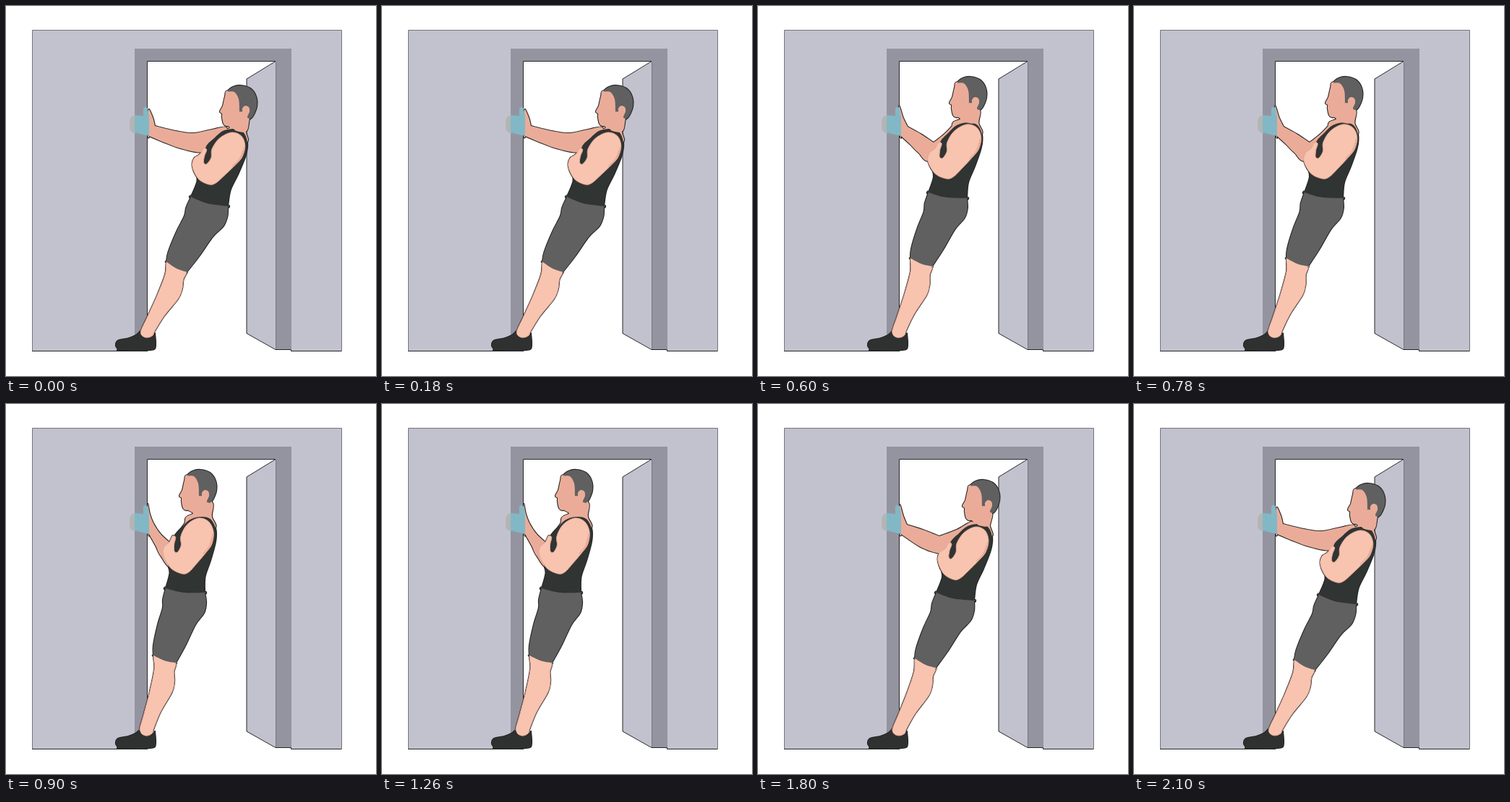
An HTML page with a canvas that plays this animation: 512x512 px, repeating every 2.4 s.

```html
<!DOCTYPE html>
<html lang="en">
<head>
<meta charset="utf-8">
<title>Doorway stretch</title>
<style>
html, body { margin: 0; width: 100%; height: 100%; overflow: hidden; background: #fff; }
canvas { display: block; width: 512px; height: 512px; }
</style>
</head>
<body>
<canvas id="stage" width="512" height="512"></canvas>
<script>
const ctx = document.getElementById('stage').getContext('2d');
const STEP = 300;
const ORDER = [0, 1, 2, 3, 3, 2, 1, 0];
const INK = '#252525', WALL = '#c2c2cf', JAMB = '#9494a0';
const SKIN = 'rgb(248, 196, 176)', SHADE = '#eaac98', TANK = '#303433', SHORTS = '#606060';

// Anchor points of each body part, one row per pose; shapes are drawn in the BASE pose.
const BASE = 1;
const anchors = {
  still: [[0, 0], [0, 0], [0, 0], [0, 0]],
  head: [[13, 5], [0, 0], [-18, -7], [-43, -14]],
  neck: [[309, 167, 336, 156, 334, 189], [297, 162, 324, 151, 324, 184],
         [279, 155, 307, 144, 310, 178], [258, 150, 286, 137, 290, 172]],
  torso: [[256, 264, 307, 277, 334, 189], [247, 261, 299, 272, 324, 184],
          [236, 258, 289, 266, 310, 178], [221, 255, 275, 261, 290, 172]],
  hips: [[222, 354, 256, 264, 307, 277], [217, 352, 247, 261, 299, 272],
         [211, 349, 236, 258, 289, 266], [204, 348, 221, 255, 275, 261]],
  leg: [[222, 354, 250, 367, 196, 458], [217, 352, 246, 365, 196, 458],
        [211, 349, 241, 360, 196, 458], [204, 348, 235, 358, 196, 458]],
  arm: [[312, 175, 281, 247, 259, 215], [301, 170, 271, 243, 250, 210],
        [288, 164, 261, 239, 236, 208], [266, 158, 244, 235, 218, 202]]
};

const farArm = [
  [197,144, 203,154, 206,166, 206,166, 235,173, 259,176, 285,171, 305,168, 300,185,
   275,202, 245,198, 222,190, 198,180, 198,180],
  [196,140, 201,155, 206,167, 206,167, 228,174, 251,183, 251,183, 275,174, 297,163,
   290,185, 265,207, 247,206, 225,198, 198,180, 198,180],
  [195,139, 201,155, 207,167, 207,167, 225,177, 243,189, 243,189, 258,177, 279,158,
   275,185, 238,214, 222,203, 210,191, 198,180, 198,180],
  [196,139, 199,152, 204,165, 214,180, 227,192, 227,192, 240,176, 256,155,
   250,190, 230,226, 214,210, 207,196, 198,180, 198,180]
];

const parts = [
  { rig: 'leg', fill: SKIN, edge: '#c99785', pts:
    [218,350, 216,370, 206,400, 194,430, 186,450, 189,457, 196,459, 203,456, 206,449,
     218,428, 236,404, 241,390, 242,377, 246,363, 232,345] },
  { rig: 'still', fill: '#2e3130', pts:
    [185,451, 185,451, 188,457, 195,460, 203,457, 206,454, 206,454, 207,466, 206,474,
     200,476, 185,477, 156,476, 156,476, 152,470, 155,463, 169,460, 179,456] },
  { rig: 'far', fill: SHADE },
  { rig: 'neck', fill: SHADE, pts:
    [292,156, 297,162, 297,164, 287,170, 290,190, 323,184, 321,168, 324,151, 310,140] },
  { rig: 'torso', fill: TANK, pts:
    [266,192, 278,179, 290,169, 305,166, 318,170, 324,184, 322,202, 312,228, 302,250,
     299,272, 299,272, 272,269, 247,261, 247,261, 255,240, 254,225, 264,212] },
  { rig: 'hips', fill: SHORTS, pts:
    [247,261, 247,261, 270,269, 299,272, 299,272, 299,286, 294,300, 280,315, 262,343,
     246,365, 246,365, 232,361, 217,352, 217,352, 219,338, 229,310, 239,288, 241,276] },
  { rig: 'head', fill: SHADE, pts:
    [294,112, 290,120, 287,133, 283,141, 286,144, 286,149, 288,158, 292,161, 298,161,
     306,168, 320,168, 324,150, 329,135, 320,115] },
  { rig: 'head', fill: SHORTS, pts:
    [294,113, 301,107, 312,105, 325,109, 333,120, 334,134, 329,147, 325,151, 325,151,
     321,149, 324,141, 323,135, 318,133, 314,137, 314,141, 310,141, 310,141, 309,124, 303,114] },
  { rig: 'arm', fill: SKIN, edge: '#dca793', pts:
    [301,170, 314,175, 319,189, 315,205, 306,216, 291,231, 280,241, 271,243, 257,235,
     249,218, 251,206, 259,200, 264,192, 268,194, 265,203, 264,212, 268,214, 274,205,
     275,193, 285,178] },
  { rig: 'arm', fill: SHADE, bare: true, pts:
    [318,190, 315,205, 305,217, 302,217, 311,207] }
];

// Moves points between poses by translation or a three-anchor affine map.
function mapper(a, b) {
  if (a.length < 6) return (x, y) => [x + b[0] - a[0], y + b[1] - a[1]];
  const axes = t => [t[2] - t[0], t[3] - t[1], t[4] - t[0], t[5] - t[1]];
  const [bx, by, cx, cy] = axes(a), [px, py, qx, qy] = axes(b);
  const det = bx * cy - by * cx;
  return (x, y) => {
    const dx = x - a[0], dy = y - a[1];
    const u = (dx * cy - dy * cx) / det, v = (bx * dy - by * dx) / det;
    return [b[0] + u * px + v * qx, b[1] + u * py + v * qy];
  };
}

// Closed smooth curve through the points; a doubled point makes a corner.
function smooth(flat, map = (x, y) => [x, y]) {
  const p = [], path = new Path2D();
  for (let i = 0; i < flat.length; i += 2) p.push(map(flat[i], flat[i + 1]));
  const n = p.length, at = i => p[(i + n) % n];
  path.moveTo(...p[0]);
  for (let i = 0; i < n; i++) {
    const [a, b, c, d] = [at(i - 1), at(i), at(i + 1), at(i + 2)];
    path.bezierCurveTo(b[0] + (c[0] - a[0]) / 6, b[1] + (c[1] - a[1]) / 6,
      c[0] - (d[0] - b[0]) / 6, c[1] - (d[1] - b[1]) / 6, c[0], c[1]);
  }
  path.closePath();
  return path;
}

const poses = farArm.map((reach, pose) => parts.map(part => ({
  ...part,
  path: part.rig === 'far' ? smooth(reach)
    : smooth(part.pts, mapper(anchors[part.rig][BASE], anchors[part.rig][pose]))
})));

function box(color, x, y, w, h) {
  ctx.fillStyle = color;
  ctx.fillRect(x, y, w, h);
}

function shape(d, fill, line) {
  const path = new Path2D(d);
  if (fill) { ctx.fillStyle = fill; ctx.fill(path); }
  if (line) { ctx.strokeStyle = line; ctx.lineWidth = 1; ctx.stroke(path); }
}

function drawRoom() {
  box('#fff', 0, 0, 512, 512);
  box(WALL, 36, 33, 429, 445);
  box(JAMB, 178, 59, 217, 419);
  box('#fff', 196, 77, 177, 401);
  box('#fff', 373, 476, 21, 2);
  shape('M333 101L373 77V475L333 453Z', WALL);
  shape('M373.5 77V475', null, '#777782');
  shape('M195.5 476V76.5H373L333 101V453L373 475.5H394.5V477.5H464.5', null, INK);
  shape('M36 477.5H196', null, INK);
  shape('M36.5 477V33.5H464.5V477', null, '#74747d');
}

function drawHand() {
  shape('M179 151Q171 152 171 160V169Q172 175 179 176Z', '#b3b5b4');
  shape('M178 151L190 152V142Q193 137 196 142L198 153V180L178 175Z', '#82b8c5');
}

// Dark strokes go under all fills, so only the silhouette is outlined.
function drawBody(body) {
  ctx.lineJoin = 'round';
  ctx.strokeStyle = INK;
  ctx.lineWidth = 2.2;
  for (const part of body) if (!part.bare) ctx.stroke(part.path);
  for (const part of body) {
    ctx.fillStyle = part.fill;
    ctx.fill(part.path);
    if (part.edge) {
      ctx.strokeStyle = part.edge;
      ctx.lineWidth = 1;
      ctx.stroke(part.path);
    }
  }
}

function draw() {
  const step = Math.floor(performance.now() / STEP) % ORDER.length;
  drawRoom();
  drawBody(poses[ORDER[step]]);
  drawHand();
  requestAnimationFrame(draw);
}
draw();
</script>
</body>
</html>
```
